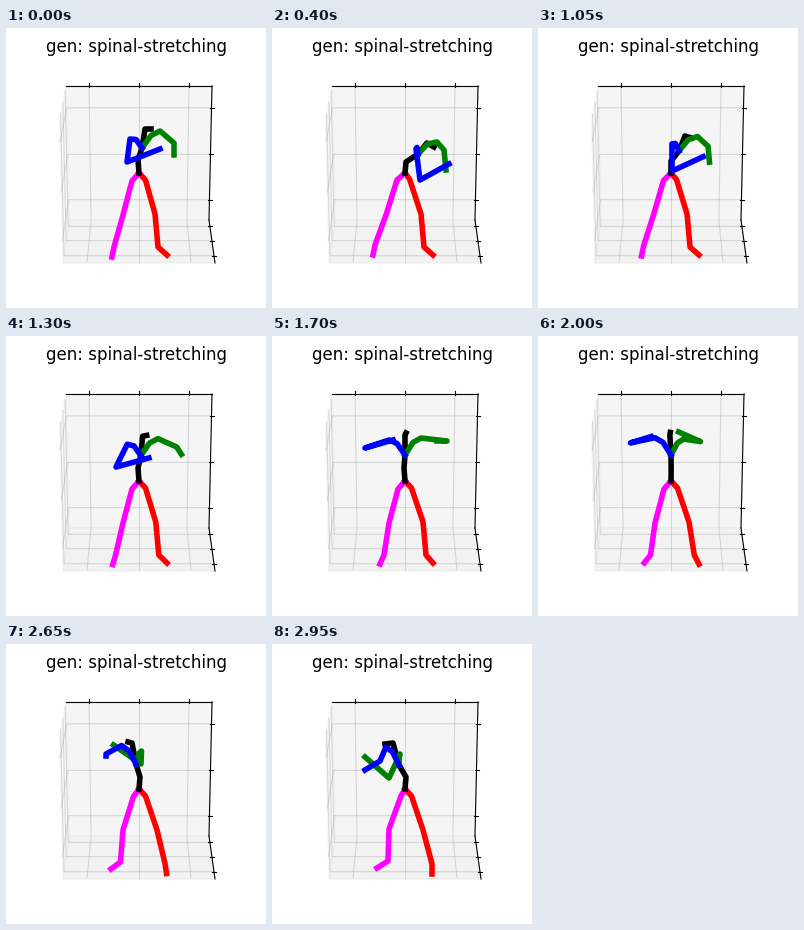
A matplotlib script for the animation above (3000 ms loop, 260 px wide and 280 px high).

```python
import numpy as np
import matplotlib.pyplot as plt
from matplotlib.animation import FuncAnimation
from matplotlib.collections import LineCollection
from matplotlib.patches import Polygon

W, H, DPI = 260, 280, 100
FRAMES, STEP = 60, 50
CX = 133.0
TICKS = (-0.685, 0.0, 0.685)

fig = plt.figure(figsize=(W / DPI, H / DPI), dpi=DPI, facecolor="white")
ax = fig.add_axes([0, 0, 1, 1])
ax.set_xlim(0, W)
ax.set_ylim(H, 0)
ax.axis("off")


def project(u, v, d):
    """Perspective of the room: u across, v up, d towards the viewer, all -1..1."""
    v, d = (v + 1) / 2, (d + 1) / 2
    w = 0.014286 - 0.000586 * v - 0.001128 * d
    y = 2.74286 - 1.94834 * v + 0.34925 * d
    return CX + u / w, y / w


def pane(corners, shade):
    ax.add_patch(Polygon([project(*c) for c in corners], alpha=0.5, lw=1, zorder=1,
                         facecolor=str(shade), edgecolor=str(shade)))


def stroke(*points):
    ax.plot(*zip(*points), color="black", lw=0.8, zorder=3)


def draw_room():
    pane([(-1, -1, -1), (-1, 1, -1), (-1, 1, 1), (-1, -1, 1)], 0.95)
    pane([(-1, -1, -1), (1, -1, -1), (1, -1, 1), (-1, -1, 1)], 0.90)
    pane([(-1, -1, -1), (1, -1, -1), (1, 1, -1), (-1, 1, -1)], 0.925)

    grid = []
    for k in TICKS:
        grid.append([project(k, 1, -1), project(k, -1, -1), project(k, -1, 1)])
        grid.append([project(1, k, -1), project(-1, k, -1), project(-1, k, 1)])
        grid.append([project(1, -1, k), project(-1, -1, k), project(-1, 1, k)])
    ax.add_collection(LineCollection(grid, colors="#b0b0b0", linewidths=0.8,
                                     alpha=0.45, zorder=2))

    edge = [(-1, 1, -1), (1, 1, -1), (1, -1, -1), (1, -1, 1)]
    for a, b in zip(edge, edge[1:]):
        stroke(project(*a), project(*b))
    for k in TICKS:
        x, y = project(k, 1, -1)
        stroke((x, y - 2.5), (x, y + 1.5))
        for x, y in (project(1, k, -1), project(1, -1, k)):
            stroke((x - 1.5, y), (x + 2.5, y))


def ease(t, start, end):
    q = min(max((t - start) / (end - start), 0), 1)
    return q * q * (3 - 2 * q)


def weights(t):
    """How far each phase of the exercise has gone at time t."""
    wide = ease(t, 1000, 1700)
    return dict(bend=ease(t, 0, 400) - ease(t, 800, 1300),
                wide=wide,
                swing=4 * wide * (1 - wide),
                over=ease(t, 1700, 2250),
                lean=ease(t, 2350, 2950))


def pose(t):
    phase = weights(t)

    def at(x, y, **moves):
        return np.array([x, y]) + sum(phase[k] * np.array(m) for k, m in moves.items())

    root = at(133, 145)
    low = at(132, 132, bend=(2, 2), over=(2, 1))
    chest = at(136, 120, bend=(10, 6), wide=(-3, -1), lean=(-6, 2))
    neck = at(139, 101, bend=(16, 14), wide=(-6, -2), over=(-2, 0), lean=(-10, 0))
    head = at(145, 101, bend=(17, 18), wide=(-11, -4), over=(-3, -1), lean=(-18, 4))

    def arm(shoulder, elbow, hand):
        collar = chest + shoulder / 2 - (0, 4)
        return [chest, collar, chest + shoulder, elbow, hand]

    return {
        "red": [root,
                at(139.5, 152, bend=(-2, -1)),
                at(149, 186, wide=(2, 0)),
                at(152, 219, wide=(2, 0), over=(4, 0), lean=(2, 1)),
                at(161, 227, over=(0, 2), lean=(-1, 1))],
        "magenta": [root,
                    at(126, 153, bend=(-1, -1), lean=(3, -1)),
                    at(117, 187, bend=(-3, 0), lean=(0, -2)),
                    at(108, 219, bend=(-5, -2), wide=(4, 0), over=(1, 0), lean=(3, -2)),
                    at(106, 229, bend=(-5, -2), wide=(2, -1), over=(-3, -2), lean=(0, -2))],
        "black": [root, low, (low + chest) / 2, chest, neck, head],
        "green": arm(
            at(18, -17, bend=(1, 5), wide=(-2, 0), over=(-6, 2), lean=(-9, 4)),
            at(168, 115, bend=(4, 7), wide=(7, -10), over=(-22, 1), lean=(-36, 28)),
            at(168, 127, bend=(6, 15), wide=(-3, -22), swing=(9, 0),
               over=(-43, -16), lean=(-29, 24))),
        "blue": arm(
            at(-12, -9, bend=(10, 4), wide=(-4, -6), over=(0, -4), lean=(3, 1)),
            at(121, 134, bend=(27, 18), wide=(-28, -22), swing=(0, 6),
               over=(-1, -9), lean=(16, 14)),
            at(154, 121, bend=(23, 15), wide=(-33, -17), swing=(2, 8),
               over=(-14, -6), lean=(-14, 28))),
    }


draw_room()
ax.text(131, 24.5, "gen: spinal-stretching", ha="center", va="baseline",
        family="DejaVu Sans", fontsize=12, color="black", zorder=20)

limbs = {color: ax.plot([], [], color=color, lw=4, zorder=5 + i,
                        solid_capstyle="projecting", solid_joinstyle="round")[0]
         for i, color in enumerate(pose(0))}


def update(i):
    for color, joints in pose(i * STEP).items():
        limbs[color].set_data(*np.transpose(joints))
    return list(limbs.values())


anim = FuncAnimation(fig, update, frames=FRAMES, interval=STEP,
                     repeat=True, repeat_delay=0, blit=False)
plt.show()
```
